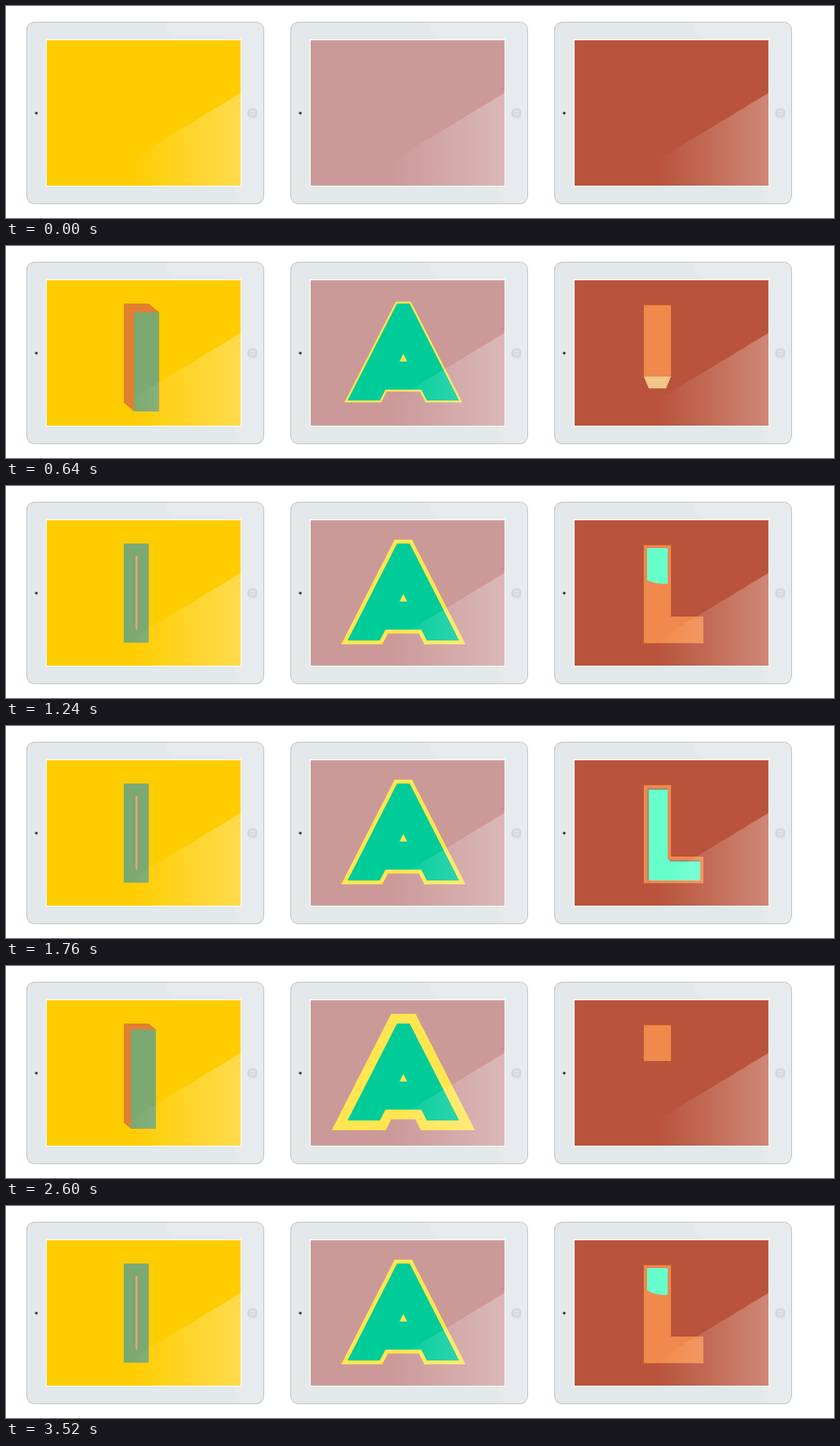
Write an HTML page with a canvas that moves like this. It is 1280 px wide and 328 px high and loops after 3560 ms.

```html
<!DOCTYPE html>
<html lang="en">
<head>
<meta charset="utf-8">
<title>Animated letters</title>
<style>
  html, body { margin: 0; width: 100%; height: 100%; overflow: hidden; background: #fff; }
  canvas { display: block; }
</style>
</head>
<body>
<canvas id="stage" width="1280" height="328"></canvas>
<script>
const ctx = document.getElementById('stage').getContext('2d');
const LOOP = 3560, STEP = 40, LETTER_LOOP = 1800, FOLD_LOOP = 2320, PITCH = 408;
const GREEN = [123, 169, 113], ORANGE = [226, 127, 48];
const CORAL = [240, 137, 75], TAN = [243, 199, 136];

const ramp = (t, from, to) => Math.min(1, Math.max(0, (t - from) / (to - from)));
const easeOut = p => 1 - (1 - p) ** 2;
const rgb = c => `rgb(${c.map(Math.round)})`;
const mix = (a, b, k) => a.map((v, i) => v + (b[i] - v) * k);

// Rises to a peak, then decays to 1.
const overshoot = (t, start, top, peak, decay) =>
  t < top ? peak * ramp(t, start, top) : 1 + (peak - 1) * Math.exp((top - t) / decay);

function poly(points, path = new Path2D()) {
  points.forEach(([x, y], i) => i ? path.lineTo(x, y) : path.moveTo(x, y));
  path.closePath();
  return path;
}

function fill(path, color, rule = 'nonzero') {
  ctx.fillStyle = color;
  ctx.fill(path, rule);
}

function rect(x, y, w, h, color) {
  ctx.fillStyle = color;
  ctx.fillRect(x, y, w, h);
}

function clipped(path, draw) {
  ctx.save();
  ctx.clip(path);
  draw();
  ctx.restore();
}

function disc(x, y, r, color) {
  ctx.fillStyle = color;
  ctx.beginPath();
  ctx.arc(x, y, r, 0, Math.PI * 2);
  ctx.fill();
}

function tablet(screenColor) {
  const body = new Path2D();
  body.roundRect(32, 25, 366.5, 281, 12);
  fill(body, '#e3e8ea');
  clipped(body, () =>
    fill(poly([[243, 25], [400, 25], [400, 307], [362, 307]]), 'rgba(255,255,255,.12)'));
  ctx.strokeStyle = '#b4b8ba';
  ctx.lineWidth = 1;
  ctx.stroke(body);

  disc(47, 165.7, 2.3, '#5d6368');
  disc(46.8, 165.7, 1.2, '#24282c');
  disc(381, 165.7, 8.2, '#d5d9db');
  ctx.strokeStyle = '#eef0f1';
  ctx.lineWidth = 1.2;
  ctx.beginPath();
  ctx.roundRect(378.5, 163.2, 5, 5, 1.4);
  ctx.stroke();

  rect(61.7, 51.5, 302.3, 227.8, '#fff');
  rect(63, 53, 299.7, 225, screenColor);
}

function glare() {
  const shine = ctx.createLinearGradient(190, 0, 362, 0);
  shine.addColorStop(0, 'rgba(255,255,255,0)');
  shine.addColorStop(1, 'rgba(255,255,255,.3)');
  fill(poly([[362.7, 134.5], [362.7, 278], [190, 278], [190, 239]]), shine);
}

// Extruded bar that springs up, flattens, then gains a centre line.
function letterI(t) {
  const x = 182, w = 38.5, base = 242.3;
  const height = 153.3 * overshoot(t, 0, 360, 1.12, 16);
  const top = base - height;
  const dx = 16 * (1 - ramp(t, 760, 888)), dy = dx * .85;
  const side = mix(ORANGE, GREEN, ramp(t, 800, 880));
  fill(poly([[x, top], [x + w, top], [x + w + dx, top + dy],
    [x + w + dx, base + dy], [x + dx, base + dy], [x, base]]), rgb(side));
  rect(x + dx, top + dy, w, height, rgb(GREEN));

  const line = 114 * overshoot(t, 1000, 1080, 1.33, 30);
  rect(200.3, 165.2 - line / 2, 3, line, '#ee9f83');
}

const AXIS = 614.25;
const symmetric = half =>
  [...half, ...half.map(([x, y]) => [2 * AXIS - x, y]).reverse()];
const leftLeg = [[604.5, 89], [528, 239], [578, 239]];
const legs = poly(symmetric([...leftLeg, [AXIS, 167]]));
const fullA = poly(symmetric([[AXIS, 167], [608.3, 178.8]]),
  poly(symmetric([...leftLeg, [586.5, 222.3]])));

// Stroke up one leg and down the other, a crossbar, then a swelling border.
function letterA(t) {
  const color = '#00cc99', run = 61.25, rise = 121.4;
  ctx.lineJoin = 'miter';
  ctx.miterLimit = 20;
  if (t >= 600) {
    const border = 6 * overshoot(t, 600, 840, 3, 55);
    if (border) {
      ctx.strokeStyle = '#ffe650';
      ctx.lineWidth = border * 2;
      ctx.stroke(fullA);
    }
    fill(fullA, color, 'evenodd');
    return;
  }
  clipped(legs, () => {
    const drawn = 2.18 * ramp(t, 0, 400) ** 1.7;
    const up = Math.min(1, drawn), down = Math.max(0, drawn - 1);
    ctx.strokeStyle = color;
    ctx.lineWidth = 46;
    ctx.beginPath();
    ctx.moveTo(AXIS - run * 1.2, 239 + rise * .2);
    ctx.lineTo(AXIS - run * (1 - up), 239 - rise * up);
    if (down) ctx.lineTo(AXIS + run * down, 239 - rise * (1 - down));
    if (drawn) ctx.stroke();
  });
  rect(586, 178.8, 57 * easeOut(ramp(t, 400, 600)), 43.5, color);
}

// Panel swinging out from its hinge, seen in perspective.
function flap(t, start, end, x, y, w, h, sideways) {
  const e = easeOut(ramp(t, start, end)), angle = (1 - e) * Math.PI / 2;
  if (!e) return;
  const length = sideways ? w : h, breadth = sideways ? h : w;
  const scale = 52 / (52 + length * Math.sin(angle));
  const reach = length * Math.cos(angle) * scale;
  const inset = breadth * (1 - scale) / 2;
  const shape = sideways
    ? [[x, y], [x + reach, y + inset], [x + reach, y + h - inset], [x, y + h]]
    : [[x, y], [x + w, y], [x + w - inset, y + reach], [x + inset, y + reach]];
  fill(poly(shape), rgb(mix(TAN, CORAL, Math.max(0, 2 * e - 1))));
}

const innerL = poly([[991, 96], [1023, 96], [1023, 207], [1073, 207], [1073, 239], [991, 239]]);

// Unfolding panels, then a spreading fill that sinks in.
function letterL(t) {
  const x = 986, w = 42;
  flap(t, 0, 280, x, 91.5, w, 55.5);
  flap(t, 280, 560, x, 147, w, 55);
  flap(t, 560, 840, x, 202, w, 41.2);
  flap(t, 840, 1080, x + w, 202, 50, 41.2, true);

  const radius = 170 * ramp(t, 1080, 1600) ** .75;
  const depth = 5 * easeOut(ramp(t, 1640, 2000));
  clipped(innerL, () => {
    if (depth) {
      fill(innerL, '#a78a79');
      ctx.translate(depth, depth);
      fill(innerL, '#66ffcc');
    } else {
      disc(1018, 81, radius, '#66ffcc');
    }
  });
}

const screens = [
  { color: '#ffcc00', draw: letterI, period: LETTER_LOOP },
  { color: '#cc9999', draw: letterA, period: LETTER_LOOP },
  { color: '#b9533b', draw: letterL, period: FOLD_LOOP }
];

function at(offset, draw) {
  ctx.save();
  ctx.translate(offset, 0);
  draw();
  ctx.restore();
}

function render(t) {
  rect(0, 0, 1280, 328, '#fff');
  screens.forEach(({ color, draw, period }, i) => {
    const phase = t % period;
    at(i * PITCH, () => tablet(color));
    if (phase) draw(phase);
    at(i * PITCH, glare);
  });
}

let origin = null;
function tick(now) {
  origin ??= now;
  const t = (now - origin) % LOOP;
  render(Math.floor(t / STEP + 1e-6) * STEP);
  requestAnimationFrame(tick);
}
render(0);
requestAnimationFrame(tick);
</script>
</body>
</html>
```
